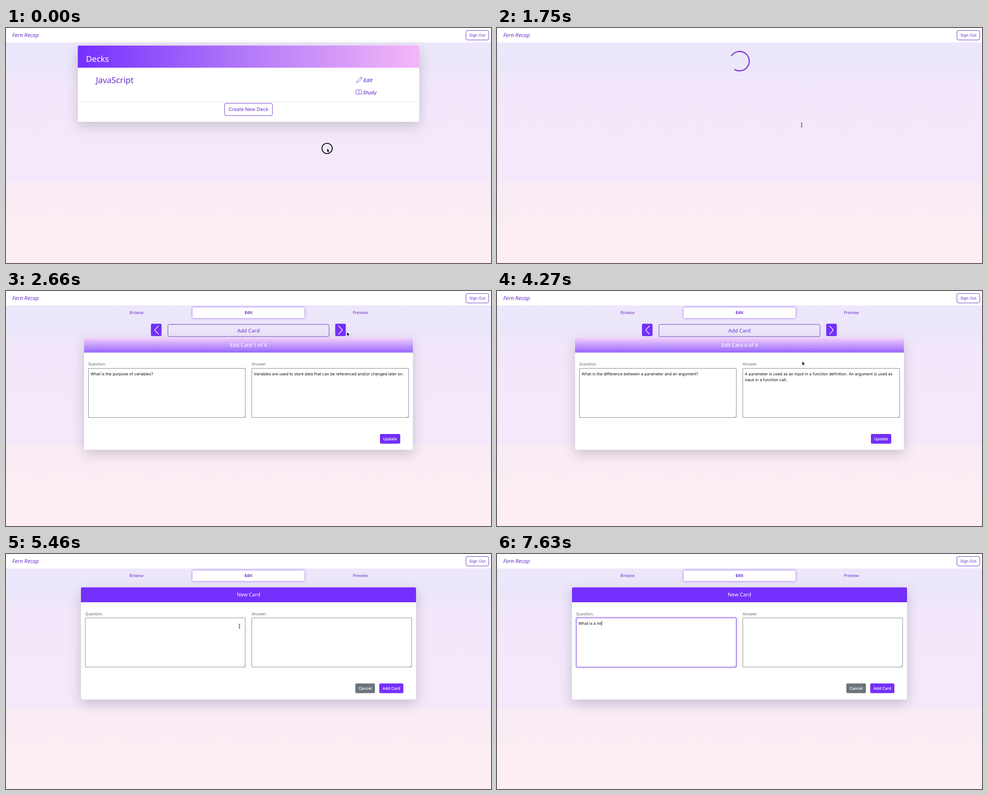
An HTML page for the animation above (8000 ms loop, 1074 by 521 pixels).

```html
<!DOCTYPE html>
<html lang="en">
<head>
<meta charset="utf-8">
<title>Flash cards</title>
<style>
  html, body { margin: 0; width: 100%; height: 100%; overflow: hidden; background: #fff; }
  svg { display: block; width: 1074px; height: 521px; }
  text { text-rendering: geometricPrecision; white-space: pre; }
  .ui { font-family: Inter, Roboto, sans-serif; }
  .head { font-family: "Noto Sans", "Open Sans", sans-serif; }
  .card { filter: drop-shadow(0 9px 13.7px rgba(0, 0, 0, .175)); }
  .tab { filter: drop-shadow(0 0 2.5px rgba(112, 48, 245, .75)); }
  .glow { filter: drop-shadow(0 0 2px rgba(112, 48, 245, .6)); }
</style>
</head>
<body>
<svg id="stage" viewBox="0 0 1074 521" xmlns="http://www.w3.org/2000/svg">
  <defs>
    <linearGradient id="sky" gradientUnits="userSpaceOnUse" x1="0" y1="32" x2="0" y2="521">
      <stop offset="0" stop-color="#ede7fb"/>
      <stop offset=".12" stop-color="#ece6fa"/>
      <stop offset=".2" stop-color="#f3e8fb"/>
      <stop offset=".634" stop-color="#f4e8fb"/>
      <stop offset=".634" stop-color="#f9ecf5"/>
      <stop offset=".85" stop-color="#fbedf3"/>
      <stop offset="1" stop-color="#ffeff3"/>
    </linearGradient>
    <linearGradient id="across">
      <stop offset="0" stop-color="#7530fe"/>
      <stop offset=".5" stop-color="#b47af8"/>
      <stop offset="1" stop-color="#f4b7f8"/>
    </linearGradient>
    <linearGradient id="down" x2="0" y2="1">
      <stop offset="0" stop-color="#f3d0fb"/>
      <stop offset=".5" stop-color="#c49cfa"/>
      <stop offset="1" stop-color="#9766fc"/>
    </linearGradient>
    <linearGradient id="row" x2="0" y2="1">
      <stop offset="0" stop-color="#ece7fb"/>
      <stop offset=".55" stop-color="#f4e8f8"/>
      <stop offset="1" stop-color="#feeff3"/>
    </linearGradient>
  </defs>
</svg>
<script>
const NS = "http://www.w3.org/2000/svg";
const LOOP = 8000, TICK = 70;
const INK = "#6a30c8", VIOLET = "#7230f8", GREY = "#6b6b6f";
const stage = document.getElementById("stage");

function add(parent, tag, attrs = {}, content) {
  const el = document.createElementNS(NS, tag);
  for (const key in attrs) el.setAttribute(key, attrs[key]);
  if (content !== undefined) el.textContent = content;
  parent.append(el);
  return el;
}
const group = (parent = stage) => add(parent, "g");
const box = (g, x, y, width, height, fill, more) =>
  add(g, "rect", { x, y, width, height, fill, ...more });
const path = (g, d, more) => add(g, "path", { d, fill: "none", ...more });
const label = (g, font, size, x, y, fill, content, more) =>
  add(g, "text", { class: font, "font-size": size, x, y, fill, ...more }, content);
const middle = { "text-anchor": "middle" };

function button(g, x, y, w, h, content, size, font = "ui", fill) {
  if (fill) box(g, x, y, w, h, fill, { rx: 3 });
  else box(g, x + .5, y + .5, w - 1, h - 1, "none", { rx: 3.6, stroke: INK });
  label(g, font, size, x + w / 2, y + h / 2 + size * .36, fill ? "#fff" : INK, content,
    { ...middle, "font-weight": fill ? 500 : 400 });
}

function card(g, x, y, w, h, headHeight, fill) {
  box(g, x, y, w, h, "#fff", { rx: 3, class: "card" });
  path(g, `M${x} ${y + headHeight}V${y + 3}q0-3 3-3h${w - 6}q3 0 3 3v${headHeight - 3}z`, { fill });
}

function area(g, x, y, w, name) {
  label(g, "ui", 8.75, x, y - 5.7, GREY, name);
  const frame = box(g, x + .5, y + .5, w - 1, 109, "#fff", { stroke: "#85858a", rx: .5 });
  const right = x + w - 1.5, low = y + 108.5;
  path(g, `M${right - 4} ${low}l4-4M${right - 2} ${low}l2-2`, { stroke: "#8a8a8a", "stroke-width": .6 });
  return frame;
}

function tabs(g) {
  box(g, 413, 36.5, 248, 23.5, "#fff", { rx: 1.5, class: "tab" });
  label(g, "head", 9.14, 289, 51.4, INK, "Browse", middle);
  label(g, "head", 9.14, 537, 51.4, INK, "Edit", { ...middle, "font-weight": 700 });
  label(g, "head", 9.14, 784.5, 51.4, INK, "Preview", middle);
}

// Shell
box(stage, 0, 0, 1074, 521, "#fff");
box(stage, 0, 32, 1074, 489, "url(#sky)");
label(stage, "head", 12, 14, 20.3, INK, "Fern Recap", { "font-style": "italic" });
button(stage, 1018, 5, 51.5, 22, "Sign Out", 8.8);

// Deck list
const decks = group();
card(decks, 159, 39, 756, 169, 49, "url(#across)");
label(decks, "head", 18.3, 177, 75, "#fff", "Decks");
const hover = box(decks, 168, 91, 738.5, 73, "url(#row)");
box(decks, 168, 163.5, 738.5, 1, "#dedbe2");
label(decks, "head", 18.3, 199, 122, INK, "JavaScript");
const slanted = { "font-style": "italic", "font-weight": 500 };
label(decks, "ui", 10.95, 791.5, 119.5, INK, "Edit", slanted);
label(decks, "ui", 10.95, 790.5, 147, INK, "Study", slanted);
const icon = (d, x, y) =>
  path(decks, d, { transform: `translate(${x} ${y}) scale(.857)`, stroke: INK, "stroke-linejoin": "round" });
icon("M12.5.5l3 3-10 10-5 2 2-5zM10.5 2.5l3 3", 775.8, 108);
icon("M8 2.8C6.5 1.5 3 1.7.5 2.8v11c2.5-1 6-1.2 7.5.2 1.5-1.4 5-1.2 7.5-.2v-11C13 1.7 9.5 1.5 8 2.8V14", 774.6, 135.2);
button(decks, 483.5, 166.5, 107, 28, "Create New Deck", 10.7);

// Loading
const loading = group();
const spinner = path(loading, "M15.2 15.2A21.5 21.5 0 1 1 15.2-15.2", { stroke: "#7330d8", "stroke-width": 2.4 });

// Card editor
const CARDS = [
  ["What is the purpose of variables?",
    "Variables are used to store data that can be referenced and/or changed later on."],
  ["How do you declare a function?",
    "Functions are declared by the function keyword, followed by a name and a body."],
  ["What is an array?", "An array is an ordered list of values."],
  ["What is the difference between a parameter and an argument?",
    "A parameter is used as an input in a function definition. An argument is used as",
    "input in a function call."]
];
const editor = group();
tabs(editor);
card(editor, 173, 104, 728, 248, 32.5, "url(#down)");
for (const [x, d] of [[321, "M337.5 77.5l-8.5 9 8.5 9"], [729, "M736.5 77.5l8.5 9-8.5 9"]]) {
  box(editor, x, 72.5, 23.5, 27.5, VIOLET, { rx: 3 });
  path(editor, d, { stroke: "#fff", "stroke-width": 1.4, "stroke-linecap": "round" });
}
button(editor, 358, 73.5, 358, 28, "Add Card", 11.4, "head");
const title = label(editor, "head", 11.4, 537, 124, "#fff", "", middle);
area(editor, 182, 171, 348.5, "Question:");
area(editor, 543.7, 171, 348.5, "Answer:");
const lines = [[187.3, 186.6], [548.8, 186.6], [548.8, 200.3]]
  .map(([x, y]) => label(editor, "ui", 8.75, x, y, "#111", ""));
button(editor, 828, 317, 45, 21.5, "Update", 8.8, "ui", VIOLET);

// New card
const PROMPT = "What is a mt";
const KEYS = [6160, 6510, 6580, 6720, 6790, 7000, 7070, 7140, 7210, 7350, 7490, 7630];
const fresh = group();
tabs(fresh);
card(fresh, 166, 74, 742, 248.5, 33, "#752ffc");
label(fresh, "head", 11.4, 537, 94.2, "#fff", "New Card", middle);
const question = area(fresh, 175.3, 141.2, 355, "Question:");
area(fresh, 543.7, 141.2, 355, "Answer:");
const typed = label(fresh, "ui", 8.75, 180.5, 156.8, "#111", "");
const caret = box(fresh, 180.5, 148.5, .8, 10.5, "#111");
button(fresh, 773.5, 287, 43.5, 21.5, "Cancel", 8.8, "ui", "#6c757d");
button(fresh, 826.5, 287, 53.5, 21.5, "Add Card", 8.7, "ui", "#752ffc");

// Pointer
const pointer = group();
const ring = add(pointer, "circle", { r: 11.4, fill: "none", stroke: "#000", "stroke-width": 1.8 });
const shapes = {
  arrow: path(pointer, "M0 0V8.4L2 6.7 3.3 9.6 4.6 9 3.3 6.2H6z",
    { fill: "#000", stroke: "#fff", "stroke-width": .5 }),
  hand: path(pointer, "M0 0c.9 0 1.1.6 1.1 1.2v2.4l3 .7c.9.3 1.2.8 1.1 1.6l-.6 2.6-.6 1.5H-.6L-3.2 6.2c-.5-.8.3-1.5 1-1l1.1.9V1.2C-1.1.6-.9 0 0 0z",
    { fill: "#fff", stroke: "#222", "stroke-width": .8 }),
  beam: path(pointer, "M-2-4.5Q0-4.5 0-3.5 0-4.5 2-4.5M0-3.5v7M-2 4.5Q0 4.5 0 3.5 0 4.5 2 4.5M-1 1h2",
    { stroke: "#222", "stroke-width": .9 })
};

// [time, x, y]
const ROUTE = [
  [0, 711, 267], [210, 711, 267], [700, 787, 150.5], [1050, 799, 113], [1190, 799, 113],
  [1750, 674.5, 215], [1890, 674.5, 215], [2380, 760, 93], [2450, 760, 93], [2660, 755, 91],
  [2800, 745, 87], [3710, 745, 87], [4130, 678, 160], [4200, 678, 160], [4270, 676, 156],
  [4620, 630, 90], [4760, 630, 90], [5040, 613, 134], [5250, 633, 136], [5320, 633, 136],
  [5460, 517, 160], [5600, 462, 168], [LOOP, 462, 168]
];
const PAGES = [[0, decks], [1330, loading], [1820, editor], [4760, fresh]];
const CARD_TIMES = [[0, 0], [2940, 1], [3290, 2], [3710, 3]];
const SHAPE_TIMES = [[0, "arrow"], [630, "hand"], [1330, "arrow"], [1750, "beam"], [2100, "arrow"],
  [2730, "hand"], [3780, "arrow"], [4550, "hand"], [4760, "arrow"], [5460, "beam"]];
const CLICKS = [[0, 140], [1120, 1260], [2870, 3010], [3220, 3290], [3640, 3780], [4620, 4760], [5600, 5740]];

const at = (steps, t) => steps.filter(s => s[0] <= t).pop()[1];
const show = (el, on) => { el.style.display = on ? "" : "none"; };

function position(t) {
  const i = ROUTE.findIndex(p => p[0] > t);
  const [t0, x0, y0] = ROUTE[i - 1], [t1, x1, y1] = ROUTE[i];
  const k = (t - t0) / (t1 - t0);
  return [x0 + (x1 - x0) * k, y0 + (y1 - y0) * k];
}

function draw(t) {
  const page = at(PAGES, t);
  for (const [, g] of PAGES) show(g, g === page);
  show(hover, t >= 630);

  spinner.setAttribute("transform", `translate(537 73.5) rotate(${167 + (t - 1750) * .48})`);

  const n = at(CARD_TIMES, t);
  title.textContent = `Edit Card ${n + 1} of ${CARDS.length}`;
  lines.forEach((line, i) => { line.textContent = CARDS[n][i] || ""; });

  const focused = t >= 5670;
  question.setAttribute("stroke", focused ? "#7d45dc" : "#85858a");
  question.setAttribute("class", focused ? "glow" : "");
  typed.textContent = PROMPT.slice(0, KEYS.filter(k => k <= t).length);
  show(caret, focused);
  if (focused) {
    const width = typed.textContent ? typed.getComputedTextLength() : 0;
    caret.setAttribute("x", 180.5 + width);
  }

  const shape = at(SHAPE_TIMES, t);
  for (const name in shapes) show(shapes[name], name === shape);
  show(ring, CLICKS.some(([a, b]) => t >= a && t < b));
  show(pointer, t < KEYS[0]);
  pointer.setAttribute("transform", `translate(${position(t)})`);
}

function frame() {
  const t = performance.now() % LOOP;
  draw(Math.floor(t / TICK) * TICK);
  requestAnimationFrame(frame);
}
frame();
</script>
</body>
</html>
```
